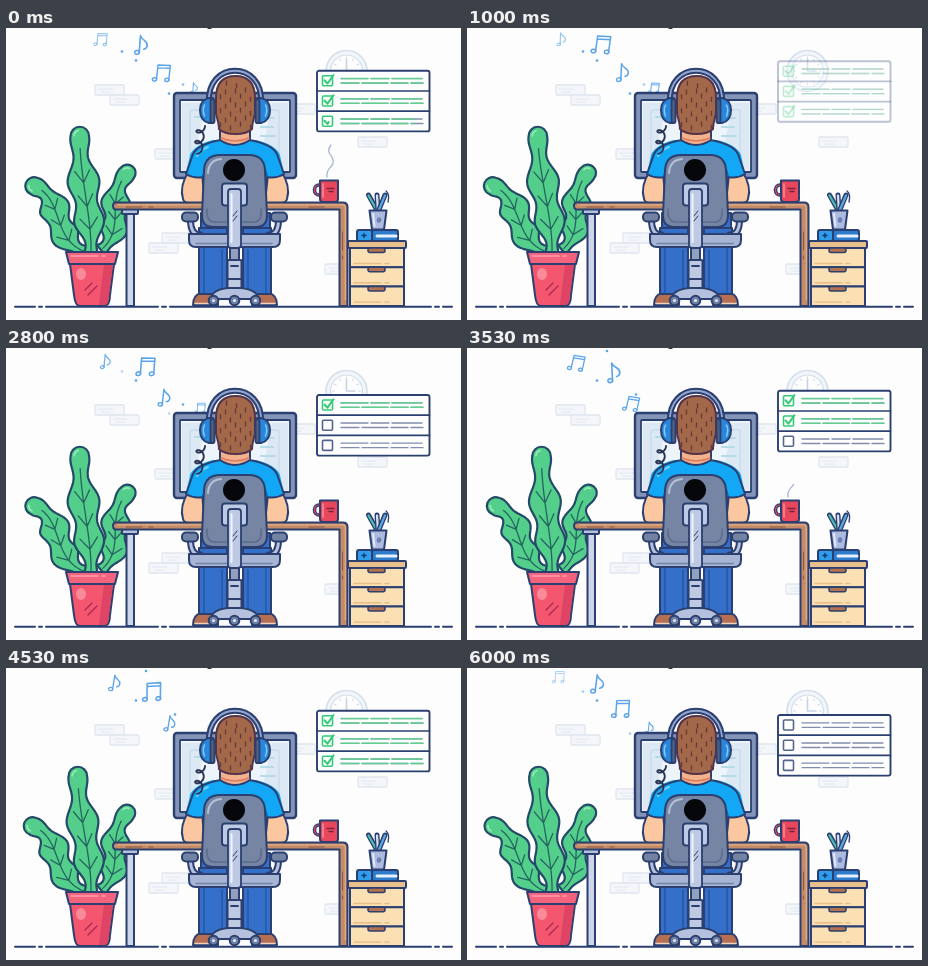
An HTML page with a canvas that plays this animation: 455 px wide and 292 px high, repeating every 6030 ms.

```html
<!DOCTYPE html>
<html lang="en">
<head>
<meta charset="utf-8">
<title>Desk</title>
<style>
html, body { margin: 0; width: 100%; height: 100%; overflow: hidden; background: #fdfdfd; }
canvas { display: block; width: 455px; height: 292px; }
</style>
</head>
<body>
<canvas id="c"></canvas>
<script>
const W = 455, H = 292, LOOP = 6030, CYCLE = 3920, STEP = 980;
const NAVY = '#2b4070', GREEN = '#35c978', PALE = '#e0e6f0', STEEL = '#b4c0dd', BLUE = '#5ba4ec';
const { PI, sin, cos } = Math;
const cv = document.getElementById('c'), g = cv.getContext('2d');
const dpr = window.devicePixelRatio || 1;
cv.width = W * dpr;
cv.height = H * dpr;

const clamp = v => Math.max(0, Math.min(1, v));
const ease = v => { v = clamp(v); return v * v * (3 - 2 * v); };

function paint(p, fill, stroke, lw) {
  if (fill) { g.fillStyle = fill; g.fill(p); }
  if (stroke) { g.strokeStyle = stroke; g.lineWidth = lw; g.stroke(p); }
}
function shape(d, fill, stroke = NAVY, lw = 2) { paint(new Path2D(d), fill, stroke, lw); }
function line(d, stroke = NAVY, lw = 1.5) { shape(d, null, stroke, lw); }
function box(x, y, w, h, r, fill, stroke = NAVY, lw = 2) {
  const p = new Path2D();
  p.roundRect(x, y, w, h, r);
  paint(p, fill, stroke, lw);
}
function oval(x, y, rx, ry, fill, stroke = null, lw = 2, rot = 0) {
  const p = new Path2D();
  p.ellipse(x, y, rx, ry, rot, 0, 7);
  paint(p, fill, stroke, lw);
}
// Runs fn once as is and once mirrored about x
function mirrored(x, fn) {
  for (const s of [1, -1]) {
    g.save();
    g.translate(x, 0);
    g.scale(s, 1);
    fn();
    g.restore();
  }
}

function wall() {
  const bricks = [[89, 57], [104, 67], [149, 121], [280, 76], [352, 109], [156, 205], [143, 215], [319, 236]];
  for (const [x, y] of bricks) {
    box(x, y, 29, 10, 1, '#f5f6fa', PALE, 1.3);
    line(`M${x + 4} ${y + 4}h14M${x + 6} ${y + 7}h9`, PALE, 1);
  }
  g.save();
  g.translate(340.5, 43);
  oval(0, 0, 20.5, 20.5, '#f2f6fb', '#d3deeb', 1.6);
  oval(0, 0, 16, 16, '#fdfdfd', '#d3deeb', 1.2);
  line('M0 -12V0H8.5', '#c8d5e5', 1.6);
  for (let i = 0; i < 12; i++) {
    line('M12 0H14', '#d0dae8', 1);
    g.rotate(PI / 6);
  }
  g.restore();
}

// A wavy leaf whose width swells along a curved spine
function leaf(root, c1, c2, tip, size, sway) {
  const bez = (a, b, c, d, u) => {
    const v = 1 - u;
    return v * v * v * a + 3 * v * v * u * b + 3 * v * u * u * c + u * u * u * d;
  };
  const at = u => [
    bez(root[0], c1[0], c2[0] + sway * .6, tip[0] + sway, u),
    bez(root[1], c1[1], c2[1], tip[1], u)
  ];
  const width = u => size * (6 + 7 * sin(PI * u) + 2.8 * cos(2 * PI * (1 - u) / .36));
  const heading = u => {
    const a = at(u - .01), b = at(u + .01);
    return Math.atan2(b[1] - a[1], b[0] - a[0]);
  };
  const side = (u, s, k = 1) => {
    const [x, y] = at(u), h = heading(u) + s * PI / 2, w = width(u) * k;
    return [x + w * cos(h), y + w * sin(h)];
  };
  const p = new Path2D(), veins = new Path2D(), n = 40;
  for (let i = 0; i <= n; i++) p.lineTo(...side(i / n, -1));
  const h = heading(1);
  p.arc(...at(1), width(1), h - PI / 2, h + PI / 2);
  for (let i = n; i >= 0; i--) p.lineTo(...side(i / n, 1));
  p.closePath();
  paint(p, '#54cf8b', '#234a68', 2.2);

  for (let i = 1; i <= n - 4; i++) veins.lineTo(...at(i / n));
  for (let u = .22; u < .75; u += .2) {
    for (const s of [-1, 1]) {
      veins.moveTo(...at(u));
      veins.lineTo(...side(u + .1, s, .6));
    }
  }
  paint(veins, null, '#23655f', 1.3);
  const shine = new Path2D();
  shine.arc(...at(1), width(1) * .6, h - 1.5, h - .3);
  paint(shine, null, '#93ebb4', 1.8);
}

function plant(s) {
  leaf([95, 222], [121, 200], [98, 172], [121, 145], .95, s * .2);
  leaf([80, 224], [45, 212], [58, 170], [27, 158], 1, s * .8);
  leaf([85, 225], [86, 190], [73, 150], [72.5, 108], 1.05, s);
  shape('M64 236H108L104 267Q104 278 98 278H74Q69 278 68 267Z', '#f4566f');
  shape('M98 237H107L103 267Q103 277 98 277H93Z', '#de4463', null);
  shape('M60 224H112L109 236H63Z', '#f4647c');
  line('M65 228h27M96 228h3', '#fba0ae', 1.6);
  oval(75, 246, 5, 6, '#f98a9a');
  line('M79 262l7 -7M82 267l9 -9', '#a8274f', 1.2);
}

function monitor() {
  box(168, 65, 122, 85, 3, '#8494b8', NAVY, 2.4);
  box(174, 72, 110, 72, 1, '#edf4fb', NAVY, 1.8);
  shape('M176 75H200L185 142H176ZM266 75H282V142H252Z', '#dce9f5', null);
  box(184, 82, 89, 46, 2, null, '#c9dded', 1.5);
  line('M189 89h22M254 90h14M255 99h12M190 116h9M255 108h14', '#b5dbe6', 2);
}

function desk() {
  box(120.5, 181, 7.5, 97, 0, '#ccd5e9');
  box(116, 180, 16, 6, 1, STEEL);
  shape('M107 177.5Q107 174.5 110 174.5H337Q341.5 174.5 341.5 179V278H333.5V181.5H110Q107 181.5 107 177.5Z', '#c48b66');
  line('M112 176.8H337Q339.3 177 339.3 181V272', '#dfae88', 1.2);
  line('M120 179h16M143 179h4M303 179h15M336.5 204v18M336.5 228v3', '#8d5a45', 1);
}

function cabinet() {
  box(342, 213, 58, 7, 1, '#e8be8c');
  for (let i = 0; i < 3; i++) {
    g.save();
    g.translate(344, 220 + i * 19.3);
    box(0, 0, 54, 19.3, 0, '#fae0b2', NAVY, 2);
    line('M4 15.5h27M35 15.5h4', '#e8bd86', 1.4);
    box(18, 0, 17, 4.5, 2, '#b5724e', NAVY, 1.5);
    g.restore();
  }
  box(351, 202, 15, 11, 2, '#2f9cec');
  box(366, 202, 26, 11, 2, '#2c7bcd');
  line('M356 207.5h4M358 205.5v4', '#17386e', 1.4);
  line('M371 208h19', '#e8f1fb', 3);
  for (const [x, colour] of [[362.5, '#52b9b4'], [371, '#d9e3f2'], [379, '#5aa4e0']]) {
    line(`M372 184L${x} 167`, NAVY, 5);
    line(`M372 184L${x} 167.5`, colour, 2.2);
  }
  line('M380 163q4 3 2 11', NAVY, 1.3);
  shape('M363.5 182.5H380.5L378 201.5H366Z', '#aebbe0');
  line('M367 186L368.5 198', '#e2e9f7', 2);
  oval(373, 192, 2.3, 2.8, '#6f82b5');
}

function mug(t) {
  const len = 38, top = ease((t - 3300) / 550), tail = ease((t - 3920) / 700);
  if (top > tail) {
    g.save();
    g.setLineDash([(top - tail) * len, 200]);
    g.lineDashOffset = -tail * len;
    line('M321 149C319 138 331 140 326 129Q320 123 325 117', '#a9b3d6', 1.3);
    g.restore();
  }
  oval(313, 162, 4.5, 5, null, NAVY, 3.6);
  oval(313, 162, 4.5, 5, null, '#e3455c', 1.2);
  shape('M314 152.5H332V171Q332 174 329 174H317Q314 174 314 171Z', '#e9475c');
  line('M317 156v13', '#fa8b96', 1.6);
  line('M321 160.5h7M323 163.5h4', '#762644', 1.3);
}

function legs() {
  box(195, 185, 69, 30, 0, '#346fc9');
  mirrored(229, () => {
    shape('M17 277V270Q17 265 24 265H34Q42 267 42 277Z', '#b66f52');
    line('M19 275.5H40', '#efd1bd', 1.5);
    box(8, 200, 28, 66, 0, '#346fc9');
    line('M31 218V264M13 222V262', '#2452a0', 1.3);
  });
}

function person() {
  shape('M207 112H250Q270 117 274 127L278 146Q270 151 262 149L258 177H199L196 149Q188 151 180 146L184 127Q188 117 207 112Z', '#12a8f5', null);
  mirrored(229, () => {
    shape('M46 143Q56 158 52 171Q51 175 46 175H30L33 146Z', '#fac7a0');
    shape('M14 112Q37 116 42 126L49 146Q41 151 32 149L28 176V140Z', '#12a8f5', null);
    line('M14 112Q37 116 42 126L49 146Q41 151 32 149L29 174', NAVY, 2);
    line('M32 148Q31 142 28 137', '#1763aa', 1.7);
  });
  line('M191 128Q194 122 202 119', '#75d1ff', 2);
  // headset cord
  const cord = new Path2D();
  for (let a = 0; a < 4.6 * PI; a += .2) cord.lineTo(195 + 4 * cos(a) - .2 * a, 98 + 1.7 * a + 3.5 * sin(a));
  paint(cord, null, '#263353', 1.9);
  shape('M214 98H244V112Q229 122 214 112Z', '#f4b28c');
  line('M215 110Q229 116 243 110', '#d97d65', 1.6);
}

function head() {
  line('M203 75C200 32 258 32 255 75', NAVY, 6);
  line('M203 75C200 32 258 32 255 75', '#92a6ce', 1.8);
  shape('M210 70Q210 48 229.5 48Q249 48 249 70V86Q246 96 246 101Q241 106 229.5 106Q218 106 213 101Q213 96 210 86Z', '#a3674a', '#53344a', 2);
  for (let row = 0; row < 7; row++) {
    const odd = row % 2, half = row ? 15 : 9;
    for (let x = -half + odd * 5; x <= half; x += 10) {
      line(`M${229.5 + x} ${54 + row * 7 + 2 * sin(x)}v4`, '#633c39', 1.3);
    }
  }
  mirrored(229, () => {
    shape('M22 70H26Q35 72 35 82Q35 93 26 95H22Z', '#2a86da');
    box(20.5, 71, 4, 24, 2, '#52617f', NAVY, 1.8);
    line('M30.5 77Q33 82 30.5 88', '#82cbff', 1.5);
  });
}

function chair() {
  mirrored(228.5, () => {
    line('M44 192Q44 207 34 207', NAVY, 7);
    line('M44 192Q44 207 34 207', STEEL, 3);
    box(36.5, 184.5, 16, 9, 4, '#7383a4');
  });
  shape('M183 206H274V212Q274 219 267 219H190Q183 219 183 212Z', '#a8b5d5');
  line('M190 215.5H266', '#7181a8', 1.5);
  shape('M198 142Q199 127 214 127H243Q258 127 259 142L261 187Q261 199 250 199H207Q196 199 196 187Z', '#7585a3');
  line('M202 145Q203 132 215 131', '#b4c0d6', 2);
  line('M201 181Q200 194 209 194H248Q256 194 255 181', '#5c6d8e', 1.6);
  oval(228, 142, 11, 11, '#06070b');
  box(216, 155.5, 25, 22, 3, '#bec9e3');
  box(222, 161, 13, 59, 3, '#bec9e3', NAVY, 1.8);
  line('M225.5 166V214', '#eff3fb', 2);
  line('M227 188l4 -5M227 193l4 -5', NAVY, 1);
  box(224, 220, 9, 13, 0, '#929fbe');
  box(221.5, 232, 14, 30, 1, '#bec9e3');
  line('M222 251H235M225 238H232', NAVY, 1.8);
  shape('M222 260H235Q252 262 252 271H205Q205 262 222 260Z', STEEL);
  for (let x = -21; x <= 21; x += 21) {
    oval(228.5 + x, 272.5, 4.8, 4.8, '#7180a2', NAVY, 2);
    oval(228.5 + x, 272.5, 1.6, 1.6, '#dce4f3');
  }
}

function list(t) {
  const inn = clamp((t - 1750) / 280), out = ease((t - 4570) / 560);
  const a = inn * (1 - out);
  if (a <= 0) return;
  const row = 20.2, y0 = 47 + 12 * (1 - ease(inn)) - 4.2 * ease((t - 2900) / 500) - 14 * out;
  g.save();
  g.globalAlpha = a;
  g.translate(311, y0);
  box(0, 0, 112.5, row * 3, 2, '#fefefe', NAVY, 1.9);
  for (let i = 0; i < 3; i++) {
    const k = clamp((t - 2450 - i * 670) / 300), wipe = clamp(k * 2);
    const text = 'M24 7.8h27m3 0h18m3 0h30M24 12.3h18m3 0h26m3 0h17m3 0h12';
    if (i) line(`M0 0H112.5`, NAVY, 1.7);
    box(5.5, 5, 10, 10, 1, null, k > .25 ? GREEN : '#566590', 1.6);
    line(text, '#828cad', 1.3);
    if (k > 0) {
      g.save();
      g.beginPath();
      g.rect(22, 0, 86 * wipe, 20);
      g.clip();
      line(text, '#62cf8e', 1.5);
      g.restore();
      g.save();
      g.setLineDash([15 * k, 30]);
      line('M7.5 9.5l3 3.2l6 -8.5', GREEN, 2);
      g.restore();
    }
    g.translate(0, row);
  }
  g.restore();
}

// u counts steps since the note left the monitor
function note(u, pair) {
  const wave = sin(2.6 * u), s = .58 + .45 * sin(PI * clamp(u / 3.3));
  g.save();
  g.globalAlpha = clamp((u + .4) / .3) * clamp((3.4 - u) / .6);
  g.translate(188 - 29 * u - 6 * wave, 60 - 18.5 * u + 7 * wave);
  g.rotate(.12 + .12 * sin(u * 3.2));
  g.scale(s, s);
  if (pair) {
    line('M-5 7V-8L8 -9V6M-5 -5L8 -6', BLUE, 1.5);
    oval(-7, 7.5, 2.3, 1.8, null, BLUE, 1.5, -.3);
    oval(6, 6.5, 2.3, 1.8, null, BLUE, 1.5, -.3);
  } else {
    line('M-1 8L-2 -9C0 -4 6 -5 6 0Q6 3 3 4', BLUE, 1.6);
    oval(-3.2, 8, 2.4, 1.9, null, BLUE, 1.5, -.3);
  }
  g.restore();
}

function spark(x, y, f, peak) {
  g.globalAlpha = clamp(1.5 * cos((f - peak) * 2 * PI) - .5);
  oval(x, y, 1.3, 1.3, BLUE);
  g.globalAlpha = 1;
}

function music(t) {
  const n = Math.floor(t / STEP), f = t / STEP - n;
  for (let k = -1; k < 4; k++) note(f + k, Math.abs(n - k) % 2 === 1);
  oval(130, 32.5, 1.3, 1.3, BLUE);
  spark(163, 65.5, f, 0);
  spark(116, 23.5, f, 0);
  spark(177, 56.5, f, .9);
  spark(140, 3, f, .62);
  spark(169, 46.5, f, .62);
}

function draw(now) {
  const t = now % LOOP, m = t % CYCLE;
  const late = m < 1700 ? m + CYCLE : m;
  g.setTransform(dpr, 0, 0, dpr, 0, 0);
  g.lineCap = g.lineJoin = 'round';
  g.fillStyle = '#fdfdfd';
  g.fillRect(0, 0, W, H);
  line('M201 -.6Q203.5 1.2 206 -.6', '#111', 1.2);
  wall();
  list(late);
  music(t);
  line('M9 278.7H29M33 278.7H36M40 278.7H152M156 278.7H160M164 278.7H425M429 278.7H433M437 278.7H446', NAVY, 2);
  plant(2.1 * cos((t - 3350) / CYCLE * 2 * PI));
  monitor();
  legs();
  person();
  desk();
  cabinet();
  mug(late);
  chair();
  head();
}

const begin = performance.now();
function frame() {
  draw(performance.now() - begin);
  requestAnimationFrame(frame);
}
frame();
</script>
</body>
</html>
```
